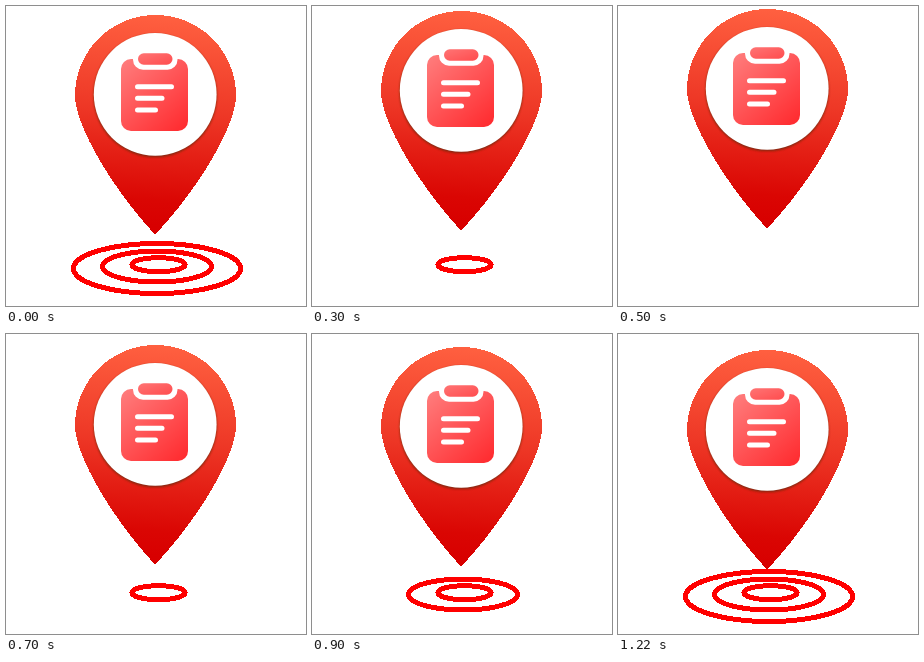
These frames come from a looping animation (300 by 300 pixels, 1300 ms). An HTML page:

```html
<!DOCTYPE html>
<html lang="en">
<head>
<meta charset="utf-8">
<title>Clipboard pin</title>
<style>
  html, body { margin: 0; width: 100%; height: 100%; overflow: hidden; background: #fff; }
  svg { display: block; width: 300px; height: 300px; }
  .ring { fill: none; stroke: #f00; stroke-width: 5; shape-rendering: crispEdges; }
</style>
</head>
<body>
<svg viewBox="0 0 300 300">
  <defs>
    <linearGradient id="red" gradientUnits="userSpaceOnUse" x1="157" y1="9" x2="142" y2="220">
      <stop offset="0" stop-color="#ff6040"/>
      <stop offset=".47" stop-color="#ed3625"/>
      <stop offset=".88" stop-color="#da0603"/>
      <stop offset="1" stop-color="#d80000"/>
    </linearGradient>
    <linearGradient id="board" gradientUnits="userSpaceOnUse" x1="118" y1="54" x2="180" y2="124">
      <stop offset="0" stop-color="#ff7c7c"/>
      <stop offset="1" stop-color="#ff2a2e"/>
    </linearGradient>
    <linearGradient id="clip" x1="0" y1="0" x2="1" y2="1">
      <stop offset="0" stop-color="#ff7474"/>
      <stop offset="1" stop-color="#ff4c4e"/>
    </linearGradient>
    <filter id="soft" x="-10%" y="-10%" width="120%" height="120%">
      <feGaussianBlur stdDeviation="1.1"/>
    </filter>
  </defs>

  <ellipse class="ring" cx="151" cy="262.5" rx="83.5" ry="25"/>
  <ellipse class="ring" cx="151" cy="260.5" rx="54.5" ry="15.5"/>
  <ellipse class="ring" cx="152.5" cy="258.7" rx="26.7" ry="7"/>

  <g id="pin">
    <path fill="url(#red)" shape-rendering="crispEdges"
      d="M69 89.5A80.5 80.5 0 0 1 230 89.5C230 121 189.8 186 149.5 228H148.5C109.2 186 69 121 69 89.5Z"/>
    <circle cx="149.2" cy="89.6" r="61.5" fill="#6e2c10" opacity=".85" filter="url(#soft)"/>
    <circle cx="149.2" cy="88.3" r="61.4" fill="#fff"/>
    <rect x="115" y="53" width="67" height="72" rx="10" fill="url(#board)"/>
    <rect x="127" y="42.5" width="44.5" height="21.3" rx="10" fill="#fff"/>
    <rect x="132" y="47.3" width="34.5" height="11.5" rx="5.75" fill="url(#clip)"/>
    <path d="M131.5 80.7H165.5M131.5 92.3H156M131.5 104H149.5"
      stroke="#fff" stroke-width="5" stroke-linecap="round"/>
  </g>
</svg>
<script>
  const LOOP = 1300;
  // [start in ms, pin offset in px, rings shown]
  const steps = [
    [0, 0, 3], [100, -2, 2], [300, -4, 1], [500, -6, 0],
    [700, 2, 1], [900, 4, 2], [1100, 7, 3]
  ];

  function play(el, pose) {
    const frames = steps.map(([at, dy, shown]) => ({
      offset: at / LOOP, easing: 'step-end', ...pose(dy, shown)
    }));
    frames.push({ ...frames[frames.length - 1], offset: 1 });
    const anim = el.animate(frames, { duration: LOOP, iterations: Infinity });
    anim.startTime = 0;
  }

  play(document.getElementById('pin'), dy => ({ transform: `translateY(${dy}px)` }));

  document.querySelectorAll('.ring').forEach((ring, i) =>
    play(ring, (dy, shown) => ({ opacity: shown >= 3 - i ? 1 : 0 })));
</script>
</body>
</html>
```
